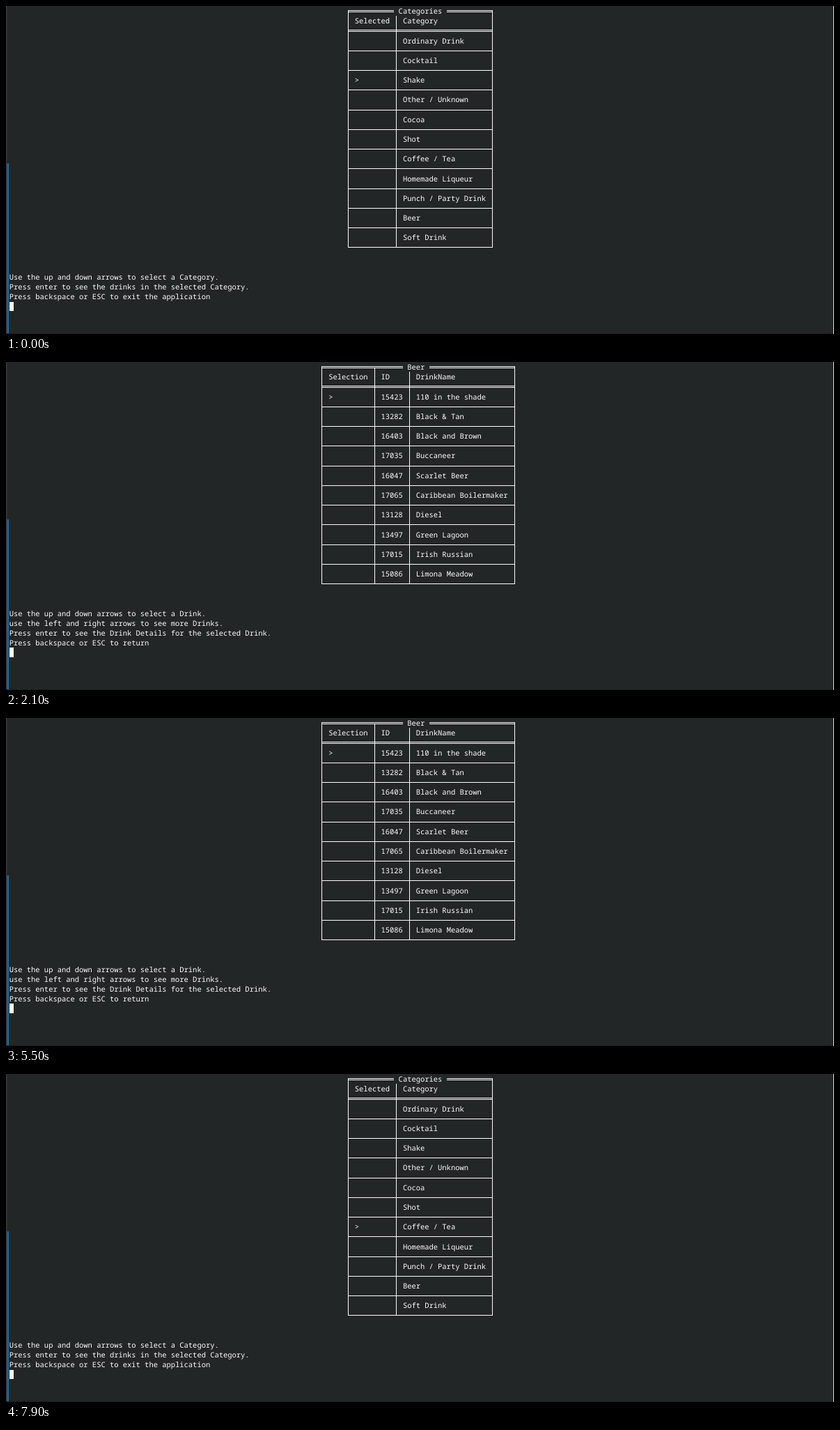
Write an HTML page that moves like this. It is 1189 by 471 pixels and loops after 8000 ms.

```html
<!DOCTYPE html>
<html lang="en">
<head>
<meta charset="utf-8">
<title>Drinks menu</title>
<style>
  html, body { margin: 0; width: 100%; height: 100%; overflow: hidden; background: #232627; }
  svg { display: block; }
  text {
    font: 10.467px "Noto Sans Mono", "DejaVu Sans Mono", monospace;
    fill: #fcfcfc;
    white-space: pre;
    text-rendering: geometricPrecision;
  }
</style>
</head>
<body>
<svg width="1189" height="471" viewBox="0 0 1189 471">
  <rect width="1189" height="471" fill="#232627"/>
  <rect width="1.5" height="471" fill="#34383b"/>
  <rect x="1.5" y="226" width="2.5" height="245" fill="#1e6ca0"/>
  <rect y="470" width="1189" height="1" fill="#1c1f20"/>
  <rect x="1188" width="1" height="471" fill="#dcdddd"/>
  <g id="screen"></g>
</svg>
<script>
const LOOP = 8000;
const CELL_W = 6.28, CELL_H = 14.13, LEFT = 4.7, TOP = 0.2, BASELINE = 11.1;
const TERMINAL_COLS = 188;

const categories = {
  title: "Categories",
  head: ["Selected", "Category"],
  rows: ["Ordinary Drink", "Cocktail", "Shake", "Other / Unknown", "Cocoa", "Shot", "Coffee / Tea",
    "Homemade Liqueur", "Punch / Party Drink", "Beer", "Soft Drink"].map(name => ["", name]),
  prompt: ["Use the up and down arrows to select a Category.",
    "Press enter to see the drinks in the selected Category.",
    "Press backspace or ESC to exit the application"]
};

const drinkPage = drinks => ({
  title: "Beer",
  head: ["Selection", "ID", "DrinkName"],
  rows: drinks.map(([id, name]) => ["", id, name]),
  prompt: ["Use the up and down arrows to select a Drink.",
    "use the left and right arrows to see more Drinks.",
    "Press enter to see the Drink Details for the selected Drink.",
    "Press backspace or ESC to return"]
});

const firstPage = drinkPage([
  ["15423", "110 in the shade"], ["13282", "Black & Tan"], ["16403", "Black and Brown"],
  ["17035", "Buccaneer"], ["16047", "Scarlet Beer"], ["17065", "Caribbean Boilermaker"],
  ["13128", "Diesel"], ["13497", "Green Lagoon"], ["17015", "Irish Russian"], ["15086", "Limona Meadow"]
]);

const secondPage = drinkPage([
  ["14378", "Lunch Box"], ["13389", "Snake Bite (UK)"],
  ["15789", "Snakebite and Black"], ["178347", "Winter Rita"]
]);

const detail = {
  title: "Drink Detail",
  head: ["Name", "Value"],
  rows: [["ID", "15423"], ["DrinkName", "110 in the shade"], ["DrinkCategory", "Beer"],
    ["DrinkIsAlcoholic", "Alcoholic"], ["DrinkGlassType", "Beer Glass"],
    ["DrinkInstructions", "Drop shooter in glass. Fill with beer"],
    ["Ingredient1", "Lager"], ["Ingredient2", "Tequila"], ["Measure1", "16 oz"], ["Measure2", "1.5 oz"]],
  prompt: ["Press any key to return.", ""]
};

// [start ms, view, selected row, loading]
const timeline = [
  [0, categories, 2], [300, categories, 3], [500, categories, 4], [700, categories, 5],
  [900, categories, 6], [1100, categories, 7], [1300, categories, 8], [1600, categories, 9],
  [1800, categories, 9, true],
  [2100, firstPage, 0], [3900, firstPage, 0, true],
  [4100, detail, -1],
  [5500, firstPage, 0], [5800, secondPage, 0],
  [6800, categories, 9], [7400, categories, 8], [7900, categories, 6]
];

const colX = col => LEFT + col * CELL_W;
const rowY = row => TOP + row * CELL_H;
const lineX = col => Math.floor(colX(col + 0.5));
const lineY = row => Math.floor(rowY(row + 0.5) + 0.45);
const escapeText = s => s.replace(/&/g, "&amp;").replace(/</g, "&lt;").replace(/>/g, "&gt;");

const text = (col, row, s) => s &&
  `<text x="${colX(col).toFixed(2)}" y="${(rowY(row) + BASELINE).toFixed(2)}">${escapeText(s)}</text>`;
const box = (x1, y1, x2, y2) =>
  `<rect x="${x1}" y="${y1}" width="${x2 - x1}" height="${y2 - y1}" fill="#fcfcfc"/>`;
const hline = (x1, x2, y) => box(x1, y, x2, y + 1);

function drawTable({ title, head, rows }, selected) {
  const widths = head.map((h, i) => Math.max(h.length, ...rows.map(r => r[i].length)) + 3);
  const total = widths.reduce((a, b) => a + b, 1);
  const borders = [Math.floor((TERMINAL_COLS - total) / 2)];
  for (const w of widths) borders.push(borders.at(-1) + w);

  const x1 = lineX(borders[0]), x2 = lineX(borders.at(-1)) + 1;
  const titleWidth = title.length + 2;
  const titleCol = borders[0] + Math.floor((total - titleWidth) / 2);
  const titleEnd = titleCol + titleWidth;
  const bottom = lineY(2 + 2 * rows.length) + 1;
  const out = [text(titleCol + 1, 0, title)];

  for (const dy of [-1, 1]) {
    out.push(hline(x1, Math.round(colX(titleCol)), lineY(0) + dy),
      hline(Math.round(colX(titleEnd)), x2, lineY(0) + dy),
      hline(x1, x2, lineY(2) + dy));
  }
  borders.forEach((col, i) => {
    const outer = i === 0 || i === borders.length - 1;
    const underTitle = col >= titleCol && col < titleEnd;
    const top = outer ? lineY(0) - 1 : underTitle ? Math.round(rowY(1)) : lineY(0) + 1;
    out.push(box(lineX(col), top, lineX(col) + 1, bottom));
  });
  head.forEach((h, i) => out.push(text(borders[i] + 2, 1, h)));
  rows.forEach((cells, r) => {
    cells.forEach((s, i) => out.push(text(borders[i] + 2, 3 + 2 * r, i === 0 && r === selected ? ">" : s)));
    out.push(hline(x1, x2, lineY(4 + 2 * r)));
  });
  return out.join("");
}

function drawScreen([, view, selected, loading]) {
  const lines = loading ? [...view.prompt, "Loading..."] : view.prompt;
  const first = 5 + 2 * view.rows.length;
  const cursor = first + lines.length;
  return drawTable(view, selected) +
    lines.map((s, i) => text(0, first + i, s)).join("") +
    box(5, Math.ceil(rowY(cursor)), 11, Math.floor(rowY(cursor + 1)));
}

const screenGroup = document.getElementById("screen");
const start = performance.now();
let shown = null;

function update(now) {
  const t = Math.max(0, now - start) % LOOP;
  const state = timeline.findLast(([at]) => at <= t);
  if (state !== shown) {
    shown = state;
    screenGroup.innerHTML = drawScreen(state);
  }
  requestAnimationFrame(update);
}
update(start);
</script>
</body>
</html>
```
